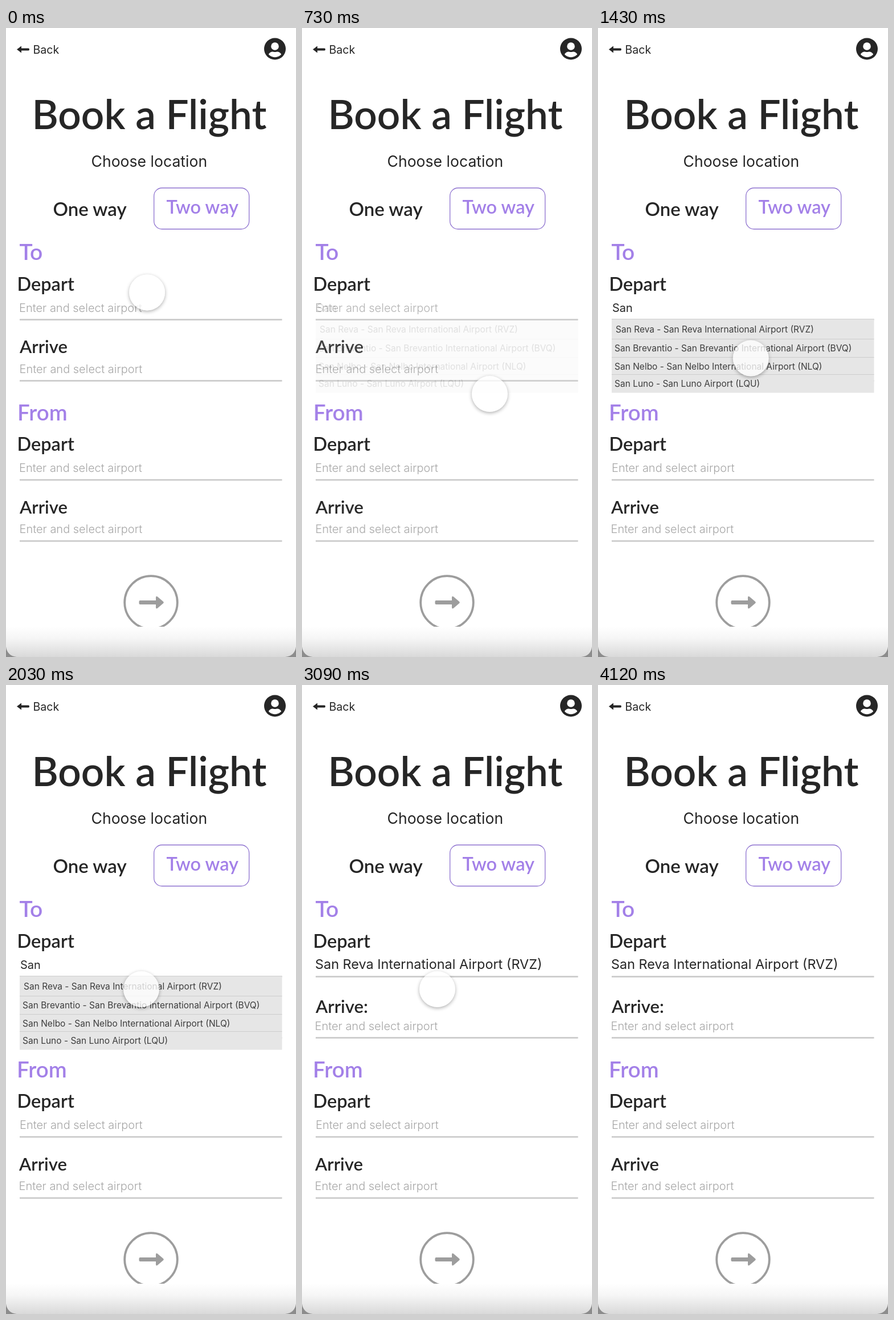
An HTML page that plays this animation: 509x1101 px, repeating every 4690 ms.

```html
<!DOCTYPE html>
<html lang="en">
<head>
<meta charset="utf-8">
<title>Book a Flight</title>
<style>
  html, body { margin: 0; width: 100%; height: 100%; overflow: hidden; background: #fff; }
  svg { position: absolute; left: 0; top: 0; }
  text { white-space: pre; fill: #262626; }
  .head { font-family: Lato, "Open Sans", sans-serif; font-weight: 600; }
  .body { font-family: Inter, Roboto, sans-serif; font-weight: 400; }
  .hint { font-weight: 300; fill: #a6a6a6; }
  .accent { fill: #a380e8; }
  .row { fill: #3d3d3d; }
  #cursor {
    position: absolute; left: -31.5px; top: -31.5px; width: 63px; height: 63px;
    border-radius: 50%; background: rgba(255, 255, 255, .77);
    box-shadow: 0 2px 6px rgba(0, 0, 0, .32);
  }
</style>
</head>
<body>
<svg id="stage" width="509" height="1101" viewBox="0 0 509 1101">
  <defs>
    <linearGradient id="shade" x1="0" y1="0" x2="0" y2="1">
      <stop offset="0" stop-color="#fff"/>
      <stop offset=".4" stop-color="#f5f5f5"/>
      <stop offset="1" stop-color="#d9d9d9"/>
    </linearGradient>
  </defs>
  <g id="screens"></g>
  <g id="header"></g>
  <path d="M19 37.5L27 31.5V35.6H39.5Q41 35.6 41 37.5T39.5 39.4H27V43.5Z" fill="#262626"/>
  <g transform="translate(472 36.5)">
    <circle r="19" fill="#262626"/>
    <circle cy="-4.5" r="6.8" fill="#fff"/>
    <path d="M-11.2 9.5C-9.8 6.8-7 4.9-3.7 4.9Q0 6.1 3.7 4.9C7 4.9 9.8 6.8 11.2 9.5C8.5 12.7 4.5 14.7 0 14.7S-8.5 12.7-11.2 9.5Z" fill="#fff"/>
  </g>
  <rect x="259.7" y="280" width="167" height="72" rx="14" fill="none" stroke="#8f73d0" stroke-width="1.3"/>
  <g fill="#9d9d9d">
    <circle cx="254.5" cy="1005.5" r="46.3" fill="none" stroke="#9d9d9d" stroke-width="3.8"/>
    <path d="M235.5 1002H263V997Q263 993.500 266 995.500L276 1004Q277.500 1005.500 276 1007L266 1015.500Q263 1017.500 263 1014V1009H235.500Q233.500 1009 233.500 1007V1004Q233.500 1002 235.500 1002Z"/>
  </g>
  <rect y="1048" width="509" height="53" fill="url(#shade)"/>
  <path d="M0 1083Q2 1099 19 1101H0ZM509 1083Q507 1099 490 1101H509Z" fill="#8c8c8c"/>
</svg>
<div id="cursor"></div>
<script>
const $ = id => document.getElementById(id);
const text = (kind, size, x, y, s) =>
  `<text class="${kind}" font-size="${size}" x="${x}" y="${y}">${s}</text>`;
const head = (...a) => text("head", ...a);
const accent = (...a) => text("head accent", ...a);
const body = (...a) => text("body", ...a);
const hint = (x, y) => text("body hint", 20, x, y, "Enter and select airport");
const line = y => `<rect x="24" y="${y - 1.3}" width="460.500" height="2.600" fill="#c9c9c9"/>`;
const rule = y => `<rect x="24" y="${y}" width="460.500" height="1" fill="#cdcdcd"/>`;

$("header").innerHTML =
  body(19.6, 47.5, 45, "Back") +
  head(71, 45.5, 177, "Book a Flight") +
  body(26.600, 149.500, 243, "Choose location") +
  head(33, 82.500, 329, "One way") +
  accent(32.500, 281.500, 325, "Two way");

// The form below the tabs; d nudges the return section sideways.
const screen = (id, d, middle) => `<g id="${id}">
  <rect y="358" width="509" height="590" fill="#fff"/>` +
  accent(39, 23.5, 405.5, "To") + head(32.500, 19.500, 460, "Depart") +
  line(510.500) + line(617.500) + middle +
  accent(38.500, 20 - d, 686.500, "From") + head(32.500, 19.500, 740, "Depart") +
  hint(23 + d, 777) + line(791) +
  head(31, 24 - d, 850, "Arrive") + hint(23.500 - d, 884) + line(898) + "</g>";

const airport = "San Reva International Airport (RVZ)";
const options = [
  [31, 532.5, "San Reva - " + airport],
  [29, 565.5, "San Brevantio - San Brevantio International Airport (BVQ)"],
  [29, 598, "San Nelbo - San Nelbo International Airport (NLQ)"],
  [29, 628, "San Luno - San Luno Airport (LQU)"]
];

$("screens").innerHTML =
  screen("empty", 0, hint(23, 497) + head(31, 24, 569, "Arrive") + hint(23.500, 604)) +
  screen("search", 1, body(20, 25, 496.500, "San") +
    '<rect x="24" y="509" width="460.500" height="129.500" fill="#e6e6e6"/>' +
    [509, 544, 576, 606].map(rule).join("") +
    options.map(o => text("body row", 15.5, ...o)).join("")) +
  screen("chosen", 1, body(23.400, 23, 497, airport) +
    head(31, 24, 573.500, "Arrive:") + hint(22.500, 604));

// Cursor path: time, x, y
const path = [
  [0, 247, 462], [30, 250, 474], [110, 278, 563], [200, 309, 631], [260, 323, 638], [330, 329, 640],
  [1340, 329, 640], [1430, 268, 578], [1490, 250, 552], [1560, 240, 537], [1630, 237, 532],
  [3230, 237, 532], [3260, 248, 530], [3320, 360, 514], [3390, 550, 502]
];

function cursorAt(t) {
  const i = path.findIndex(p => p[0] > t);
  if (i < 0) return [600, 502];
  const [a, b] = [path[i - 1], path[i]];
  const u = (t - a[0]) / (b[0] - a[0]);
  return [1, 2].map(k => a[k] + (b[k] - a[k]) * u);
}

function draw() {
  const t = performance.now() % 4690;
  const u = Math.min(1, Math.max(0, (t - 707) / 300));
  $("search").setAttribute("opacity", t < 730 ? 0 : 1 - (1 - u) ** 2);
  $("chosen").setAttribute("opacity", t < 2230 ? 0 : 1);
  const [x, y] = cursorAt(t);
  $("cursor").style.transform = `translate(${x}px, ${y}px)`;
  requestAnimationFrame(draw);
}
draw();
</script>
</body>
</html>
```
